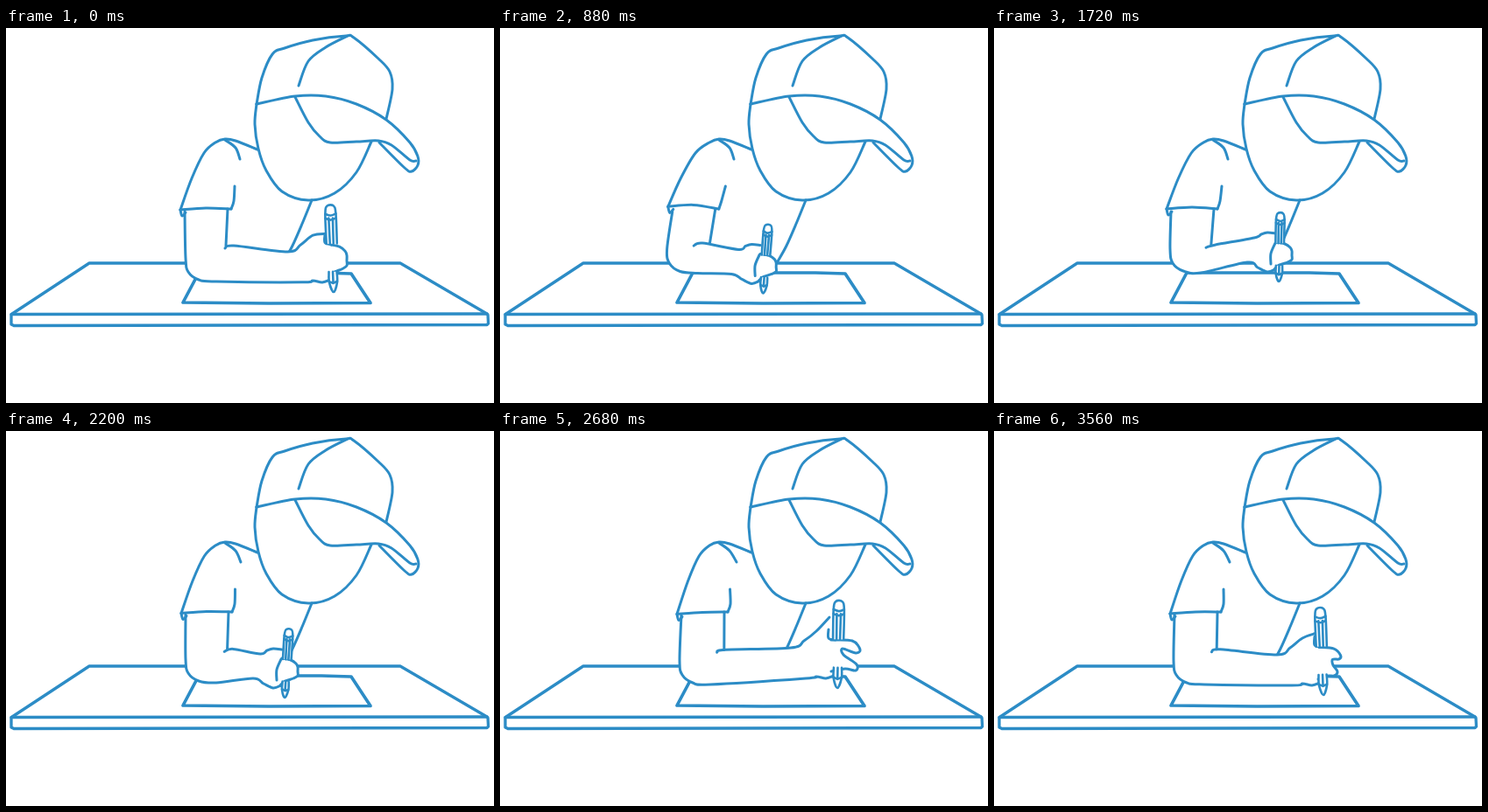
Animation, 557 px wide and 429 px high, one loop 3600 ms. Source, as an HTML page with a canvas:

```html
<!DOCTYPE html>
<html lang="en">
<head>
<meta charset="utf-8">
<title>Child drawing at a table</title>
<style>
html, body { margin: 0; width: 100%; height: 100%; overflow: hidden; background: #fff; }
canvas { display: block; }
</style>
</head>
<body>
<canvas id="stage" width="557" height="429"></canvas>
<script>
const ctx = document.getElementById('stage').getContext('2d');
const LOOP = 3600, STEP = 40, BLUE = '#2c8cc6';

// x, y: pencil tip; lean: pencil tilt; pull: sleeve shift;
// elbow: lowest point of the arm; open: how far the fingers spread
const poses = [
  { time: 0,    x: 374, y: 303, lean: -4, pull: 0,  elbow: 290, open: 0 },
  { time: 480,  x: 315, y: 309, lean: 10, pull: -4, elbow: 286, open: 0 },
  { time: 1280, x: 294, y: 297, lean: 2,  pull: -9, elbow: 277, open: 0 },
  { time: 1720, x: 325, y: 291, lean: 2,  pull: -2, elbow: 280, open: 0 },
  { time: 2200, x: 318, y: 306, lean: 5,  pull: 1,  elbow: 288, open: 0 },
  { time: 2680, x: 385, y: 295, lean: 2,  pull: 3,  elbow: 290, open: 1 },
  { time: 3560, x: 376, y: 303, lean: -4, pull: 2,  elbow: 290, open: .5 }
];

// Hand outlines relative to the pencil tip
const FIST = [-3,-46, 7,-44, 13,-40, 15,-36, 15,-31, 15,-26, 10,-23, 4,-21, -1,-19, -5,-15];
const SPREAD = [-7,-56, 17,-55, 26,-45, 21,-41, 6,-46, 7,-39, 22,-28, 21,-21, 9,-23, -7,-20];
const THUMB_NEAR = [-4,-45, -9,-33, -9,-21];
const THUMB_FAR = [-10,-68, -10,-58, -2,-56];

const mix = (a, b, u) => a + (b - a) * u;
const mixAll = (a, b, u) => a.map((v, i) => mix(v, b[i], u));
const shift = (p, x, y) => p.map((v, i) => v + (i % 2 ? y : x));

// Periodic cubic interpolation without overshoot
function poseAt(t) {
  const n = poses.length, key = i => poses[(i + n) % n];
  const i = poses.findLastIndex(p => p.time <= t);
  const span = k => (key(k + 1).time - key(k).time + LOOP) % LOOP;
  const h = span(i), u = (t - key(i).time) / h, v = 1 - u;
  const pose = {};
  for (const name in key(i)) {
    const slope = k => (key(k + 1)[name] - key(k)[name]) / span(k);
    const tangent = k => {
      const p = slope(k - 1), q = slope(k);
      return p * q > 0 ? 2 * p * q / (p + q) : 0;
    };
    pose[name] = key(i)[name] * v * v * (1 + 2 * u) + key(i + 1)[name] * u * u * (3 - 2 * u)
      + h * u * v * (v * tangent(i) - u * tangent(i + 1));
  }
  pose.reach = Math.max(0, Math.min(1, (pose.x - 325) / 50));
  return pose;
}

// Smooth path through a flat list of points
function trace(p, join = false) {
  const last = p.length / 2 - 1;
  const at = i => { i = Math.max(0, Math.min(last, i)); return [p[2 * i], p[2 * i + 1]]; };
  join ? ctx.lineTo(p[0], p[1]) : ctx.moveTo(p[0], p[1]);
  for (let i = 0; i < last; i++) {
    const [a, b, c, d] = [at(i - 1), at(i), at(i + 1), at(i + 2)];
    ctx.bezierCurveTo(b[0] + (c[0] - a[0]) / 6, b[1] + (c[1] - a[1]) / 6,
      c[0] - (d[0] - b[0]) / 6, c[1] - (d[1] - b[1]) / 6, c[0], c[1]);
  }
}

function curve(...p) {
  ctx.beginPath();
  trace(p);
  ctx.stroke();
}

function line(...p) {
  ctx.beginPath();
  for (let i = 0; i < p.length; i += 2) ctx.lineTo(p[i], p[i + 1]);
  ctx.stroke();
}

function reversed(p) {
  const out = [];
  for (let i = p.length - 2; i >= 0; i -= 2) out.push(p[i], p[i + 1]);
  return out;
}

function drawTable() {
  ctx.lineWidth = 3.3;
  line(7, 327, 95, 269, 450, 269, 549, 327);
  line(6, 327.5, 549, 327);
  line(6, 328, 6, 339, 9, 340.5, 549, 339.5, 550.5, 338, 550, 328);
  ctx.lineWidth = 3.7;
  line(220, 280, 202, 314, 300, 315, 416, 314.5, 394, 281, 360, 280, 220, 280);
}

function drawHead() {
  ctx.lineWidth = 3;
  curve(286,87, 284,110, 288,138, 297,163, 315,187, 345,197, 375,189, 400,165, 417,130);
  curve(286,87, 292,57, 304,30, 318,23, 350,14, 388,9, 397,11, 425,35, 438,50, 441,70, 434,104);
  curve(286,87, 330,78, 365,78, 400,87, 434,105, 461,131, 470,147, 470,157, 463,164, 455,160, 426,131);
  curve(330,79, 345,108, 358,124, 370,131, 400,130, 425,129, 440,134, 461,151, 468,152);
  curve(390,9, 365,22, 345,38, 334,66);
  curve(349,197, 338,224, 327,249, 317,267);
}

function drawSleeve(d) {
  const cx = 199 + d, cy = 208 + d / 2, ex = 257 + d;
  curve(287,139, 262,129, 250,127, 239,131, 226 + .4 * d,143, 212 + .8 * d,172, cx,cy);
  curve(250,128, 262,137, 267 + Math.max(d, 0),150);
  curve(cx, cy, 228 + d, cy - 2, ex, 207);
  curve(ex, 207, ex + 3, 198, 261 + d / 2, 181);
  curve(cx, cy, cx + 2, cy + 7, cx + 6, cy + 3);
}

function drawArm({ x, y, pull, elbow, open, reach }) {
  const side = 205 + 2 * Math.min(pull, 0);
  const under = [
    204 + pull,210, side,elbow - 27, side + 3,elbow - 11, side + 15,elbow - 2, side + 35,elbow,
    ...shift([-36,-23 + 11 * reach, -24,-17 + 3 * reach, -13,-12, -4,-15], x, y)
  ];
  const bendX = 251 + 1.6 * pull, bendY = 249 + .4 * pull;
  const foldX = bendX - 1 - 2.4 * Math.abs(pull);
  const over = [
    foldX,bendY + 3, foldX + 10,bendY,
    ...shift([
      -28 - 25 * reach,-51 + 4 * reach, -20 - 18 * reach,-55,
      -13 - 11 * reach,-57 - 9 * reach, -3 - 6 * reach,-56 - 12 * reach - 14 * open * open
    ], x, y)
  ];
  const fist = FIST.map((v, i) => i % 2 ? v * (1 + .2 * reach) : v);
  const hand = shift(mixAll(fist, SPREAD, open), x, y);

  ctx.beginPath();
  trace(under);
  trace(reversed(hand), true);
  trace(reversed(over), true);
  ctx.lineTo(bendX, bendY);
  ctx.lineTo(253 + pull, 207);
  ctx.fill();
  for (const edge of [under, over, hand]) curve(...edge);
  line(253 + pull, 207, bendX, bendY);
  curve(...shift(mixAll(THUMB_NEAR, THUMB_FAR, reach), x, y));
}

function drawPencil({ x, y, lean, reach }) {
  const len = mix(80, 101, reach), w = len * .06;
  const tip = w * .75, grip = -len * .56, band = -len * .85, cap = -len * .9;
  const shape = (...p) => {
    ctx.beginPath();
    trace(p);
    ctx.fill();
    ctx.stroke();
  };
  ctx.save();
  ctx.translate(x, y);
  ctx.rotate(lean / len);
  ctx.lineWidth = 2.6;
  shape(-w, grip, -w, cap, -w * .6, -len + 1, w * .6, -len + 1, w, cap, w, grip);
  for (const ring of [cap, band]) curve(-w, ring, 0, ring + 2, w, ring);
  for (const side of [-1, 1]) line(side * w * .38, band, side * w * .33, grip);
  shape(-tip, -len * .24, -tip, -len * .12, 0, -1, tip, -len * .12, tip, -len * .24);
  line(-tip, -len * .13, 0, -len * .11, tip, -len * .13);
  line(0, -len * .24, 0, -len * .12);
  ctx.restore();
}

function render(now) {
  const pose = poseAt(Math.floor(now % LOOP / STEP) * STEP);
  ctx.fillStyle = '#fff';
  ctx.fillRect(0, 0, 557, 429);
  ctx.strokeStyle = BLUE;
  ctx.lineCap = ctx.lineJoin = 'round';
  drawTable();
  drawHead();
  drawArm(pose);
  drawSleeve(pose.pull);
  drawPencil(pose);
}

let start;
function tick(now) {
  start ??= now;
  render(now - start);
  requestAnimationFrame(tick);
}
render(0);
requestAnimationFrame(tick);
</script>
</body>
</html>
```
